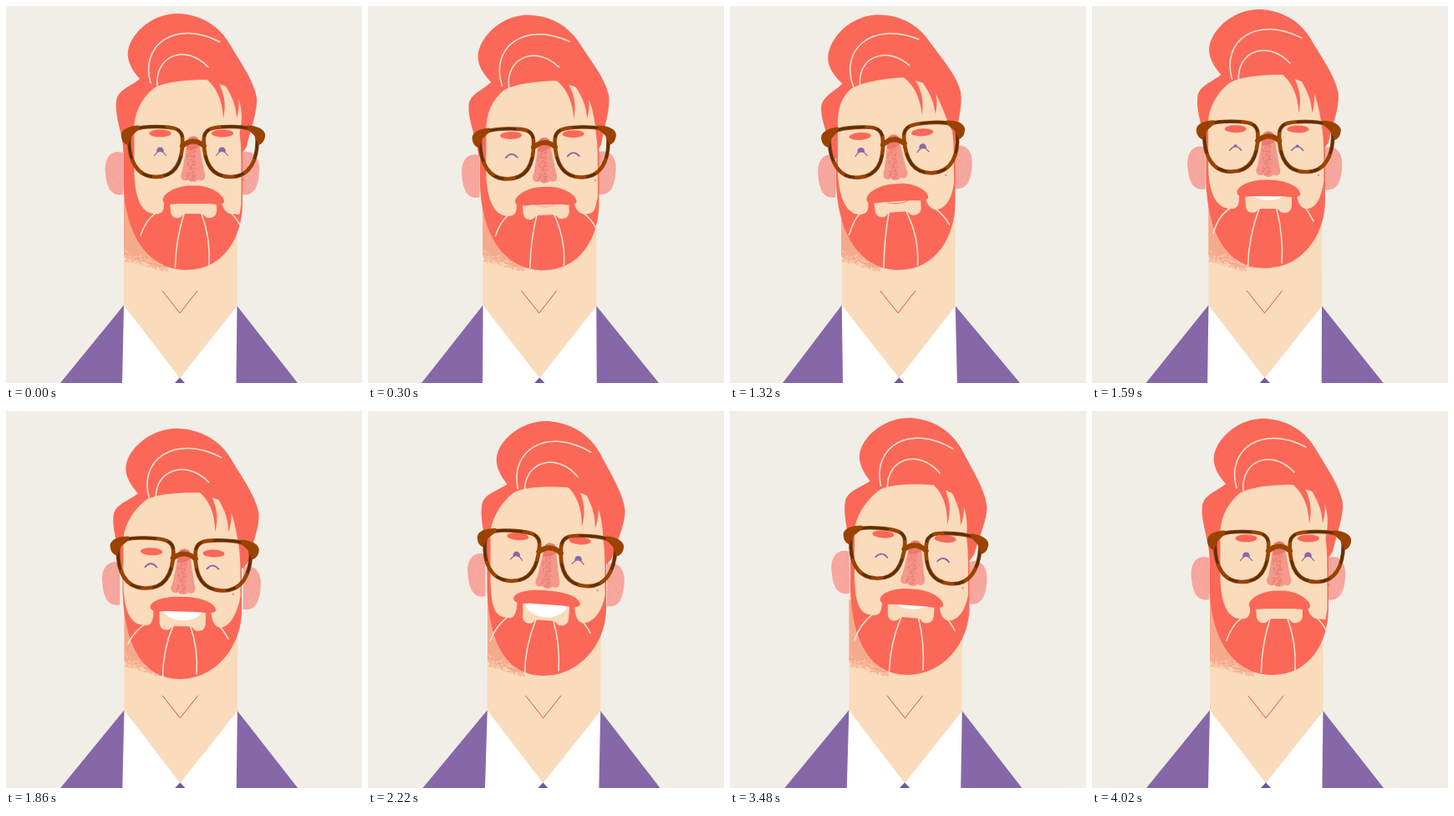
Recreate the animation shown at these times as an HTML page with a canvas. Size 426 px wide and 450 px high, loop 4.05 s.

```html
<!DOCTYPE html>
<html lang="en">
<head>
<meta charset="utf-8">
<title>Bearded man</title>
<style>
  html, body { margin: 0; width: 100%; height: 100%; overflow: hidden; background: #f1eee7; }
  canvas { display: block; }
</style>
</head>
<body>
<canvas id="stage" width="426" height="450"></canvas>
<script>
const g = document.getElementById('stage').getContext('2d');
const LOOP = 4050;
const RED = '#fc6858', SKIN = '#fadbbc', PURPLE = '#8668a9', LINE = '#fbe9d6', FRAME = '#9a4300';

// n: neck shift, hx/hy/lean: hair shift and tilt, a: face tilt, gx/gy: glasses bridge,
// w: head width, jaw: left jaw edge, cx/cy: chin, burn: sideburn width, part: beard parting
const right = { n: 0, hx: 0, hy: 0, lean: 0, a: 0, gx: 224, gy: 161, w: 1, jaw: 140.5, cx: 216, cy: 315,
  burn: 13, part: 223, smile: 0, eye: 1, brow: -9 };
const left = { n: -7.5, hx: -26, hy: 2, lean: -5.5, a: -2.6, gx: 198, gy: 164, w: 1, jaw: 127.5, cx: 203, cy: 316,
  burn: 2, part: 206, smile: .1, eye: 1, brow: -9 };
const leftUp = { ...left, n: -8, hx: -26.5, hy: 0, a: -3.6, gx: 195.5, gy: 159, jaw: 127, cx: 202, cy: 315,
  part: 204.5, brow: -6 };
const rise = { ...right, n: -2, hx: -6, hy: -7, gx: 211, gy: 153, jaw: 136, cx: 207, cy: 312,
  burn: 3, part: 207, smile: .35, eye: .6 };
const laugh = { n: .5, hx: 0, hy: 12, lean: .5, a: 1.8, gx: 213.5, gy: 170, w: 1.035, jaw: 139.5, cx: 208, cy: 320,
  burn: 1, part: 208, smile: .8, eye: 0, brow: -1 };
const grin = { n: 2, hx: 8, hy: 4, lean: 3.5, a: 4, gx: 218, gy: 163, w: 1.02, jaw: 142.5, cx: 210, cy: 316,
  burn: 4, part: 208, smile: 1, eye: 1, brow: -10.5 };
const calm = { n: 1.5, hx: 8.5, hy: 0, lean: 3.3, a: 4.2, gx: 222, gy: 160, w: 1.01, jaw: 144, cx: 212, cy: 315,
  burn: 5, part: 211, smile: .4, eye: 0, brow: -10 };
const grinEnd = { ...grin, hy: 2, gx: 220, gy: 161.5, smile: .85 };

const timeline = [[0, right], [120, right], [480, left], [600, left], [1320, leftUp], [1520, rise],
  [1860, laugh], [2220, grin], [2900, grinEnd], [3380, { ...calm, eye: 1 }], [3480, calm],
  [3740, right], [LOOP, right]];

const clamp = v => Math.max(0, Math.min(1, v));

function poseAt(t) {
  const i = timeline.findIndex(k => k[0] > t);
  const [t0, p] = timeline[i - 1], [t1, q] = timeline[i];
  const u = (t - t0) / (t1 - t0), e = u * u * (3 - 2 * u), out = {};
  for (const k in p) out[k] = p[k] + (q[k] - p[k]) * e;
  out.eye = Math.min(out.eye, Math.abs(t - 300) / 90);
  return out;
}

let seed = 7;
const rnd = () => (seed = seed * 16807 % 2147483647) / 2147483647;
const cloud = n => Array.from({ length: n }, () => [rnd(), rnd(), .25 + rnd() * .35]);
const noseDots = cloud(260), earDots = cloud(60), neckDots = cloud(520);

function fill(d, color) { g.fillStyle = color; g.fill(new Path2D(d)); }
function stroke(d, color, w) {
  g.strokeStyle = color; g.lineWidth = w; g.lineCap = 'round';
  g.stroke(new Path2D(d));
}
function oval(x, y, rx, ry, color) {
  g.fillStyle = color; g.beginPath(); g.ellipse(x, y, rx, ry, 0, 0, 7); g.fill();
}
function group(x, y, deg, draw, sx = 1) {
  g.save(); g.translate(x, y); g.rotate(deg * Math.PI / 180); g.scale(sx, 1);
  draw(); g.restore();
}
function dots(list, color, place) {
  g.fillStyle = color;
  for (const [u, v, r] of list) {
    const [x, y] = place(u, v);
    g.fillRect(x - r, y - r, 2 * r, 2 * r);
  }
}

function drawBody(p) {
  const n = p.n, l = 141 + n, r = 277 + n, cl = 141 + n * .9, cr = 276.5 + n * .85, tip = 208 + n * .7;
  const il = 139 + n * .5, ir = 275.5 + n * .45;
  fill(`M${cl},357 L${tip},444 L${cr},358 L${ir},451 H${il}Z`, '#fff');
  fill(`M${l},200 H${r} L${cr},358 L${tip},444 L${cl},357Z`, SKIN);
  fill(`M${cl},357 L${65 + n * .25},450 V451 H${il}Z`, PURPLE);
  fill(`M${cr},358 L${349 + n * .25},450 V451 H${ir}Z`, PURPLE);
  fill(`M${tip},443.5 L${tip - 7},451 H${tip + 7}Z`, '#6f57a0');
  stroke(`M${187 + n * .9},340 L${208 + n * .85},366.5 L${229 + n * .9},340`, '#d9534a', 1);

  const end = p.cx - 22;
  fill(`M${l},225 V298 Q${l + 20},303 ${end - 12},311 L${end + 15},313 V240Z`, '#f6aa8d');
  dots(neckDots, '#f6aa8d', (u, v) => [l + 1 + u * (end - l - 1), 297 + u * 13 + v * v * 8]);
  dots(neckDots.slice(0, 110), SKIN, (u, v) => [l + 1 + u * (end - l), 298 + u * 13 - v * v * 7]);
}

function drawEars(p) {
  const rise = 85 * Math.sin(p.a * Math.PI / 180), x = p.jaw + 70.5, y = p.gy + 39;
  for (const s of [-1, 1]) group(x + s * 77 * p.w, y + s * rise, 0, () => {
    fill('M-6,-25 C9,-30 17,-17 15,-1 C14,14 9,28 -6,25Z', '#f6a69d');
    dots(earDots, '#f9b6ad', (u, v) => [v * 12, (u - .5) * 40]);
  }, s);
}

function drawHead(p) {
  const { jaw, cx, cy } = p, r = jaw + 142.5, fy = p.gy - 161;
  fill(`M${jaw},${150 + fy} V${212 + fy * .4} C${jaw + 2},${275 + fy * .4} ${cx - 45},${cy} ${cx},${cy}
    C${cx + 45},${cy} ${r},${275 + fy * .4} ${r},${235 + fy * .4} V${158 + fy}Z`, RED);
  group(220 + p.hx, 80 + p.hy, p.lean, () => {
    g.translate(-220, -80);
    fill(`M141,175 C139,150 130,132 132,113 C134,100 149,96 160,87 C152,78 144,66 146,53
      C151,29 178,9 205,9 C235,10 256,25 268,46 C281,68 297,90 300,110
      C301,127 293,145 288,168 L283,175Z`, RED);
    stroke('M173,92 C160,47 202,15 256,43', LINE, 1.5);
    stroke('M181,95 C178,58 216,45 242,73', LINE, 1.5);
  }, p.w);
}

function drawSkin(p, at) {
  const l = p.jaw + p.burn, r = p.jaw + 142, fy = p.gy - 161, lip = 73 - 7 * p.smile;
  const cheek = 210 + fy + 2 * p.burn;
  fill(`M${l},${146 + fy} C${l},${127 + fy} ${at(-61, -52)} ${at(-47, -63)}
    C${at(-33, -71)} ${at(-5, -73)} ${at(16, -73)} L${at(48, -62)}
    C${at(57, -50)} ${at(61, -30)} ${r - 3},${152 + fy} C${r - 1},${165 + fy} ${r - 1},${180 + fy} ${r - 1},${200 + fy}
    V${cheek} C${r - 4},${cheek + 18} ${at(58, 87)} ${at(45, 87)}
    C${at(39, 86)} ${at(35, 80)} ${at(34, lip)} L${at(-35, lip)}
    C${at(-34, 84)} ${at(-38, 88)} ${at(-46, 87)}
    C${at(-60, 87)} ${l + 1},${233 + fy} ${l},${200 + fy}Z`, SKIN);
}

function drawBeardLines(p, at) {
  const q = p.part, fy = p.gy - 161, low = p.cy - 4;
  stroke(`M${at(-46, 87)} Q${q - 56},${256 + fy} ${q - 62},${274 + fy * .4}`, LINE, 1.5);
  stroke(`M${at(-11, 87)} Q${q - 20},${280 + fy * .5} ${q - 20.5},${low + 1}`, LINE, 1.5);
  stroke(`M${at(10, 87)} Q${q + 22},${278 + fy * .5} ${q + 20},${low - 2}`, LINE, 1.5);
  stroke(`M${at(44, 85)} Q${q + 52},${252 + fy} ${q + 58},${263 + fy}`, LINE, 1.5);
}

function drawEye(x, open) {
  group(x, 12 + 2 * (1 - open), 0, () => {
    if (open > .05) oval(0, 0, 4.3 * open, 4.5 * open, PURPLE);
    const arc = `M-7,${3.5 + 2 * open} Q0,-4.5 7,${3.5 + 2 * open}`;
    fill(arc, SKIN);
    stroke(arc, PURPLE, 1.8 - .6 * open);
  });
}

function drawMouth(s) {
  const lip = 76 - 7 * s, w = 26 * Math.min(1, .4 + .6 * s), deep = 3 + 23 * s * s;
  fill(`M-28,${lip - 3} L-27,85 Q-26,92 -19,92 C-13,92 -14,87 -9,87 H9
    C14,87 13,92 19,92 Q27,92 28,84 V${lip - 3}Z`, SKIN);
  const mouth = `M${-w},${lip - 1} C${-w * .7},${lip + deep * .75} ${w * .7},${lip + deep * .75} ${w},${lip - 1}`;
  g.globalAlpha = clamp((s - .12) * 6);
  fill(mouth, '#fff');
  g.globalAlpha = clamp(s * 10) * clamp((.3 - s) * 6);
  stroke(mouth, '#f28b78', 1.2);
  g.globalAlpha = 1;
  const k = 1 + .09 * s, top = 53.5 - 2 * s, x = v => v * k;
  fill(`M${x(-36)},${lip - 4} C${x(-38)},${lip - 13} ${x(-20)},${top} ${x(-4)},${top}
    H${x(4)} C${x(20)},${top} ${x(38)},${lip - 12} ${x(37)},${lip - 3}
    C${x(35)},${lip + 1} ${x(26)},${lip} ${x(18)},${lip - 1} H${x(-18)}
    C${x(-26)},${lip} ${x(-34)},${lip + 1} ${x(-36)},${lip - 4}Z`, RED);
}

function drawNose() {
  const d = 'M-6,-3 Q0,-8 6,-3 L13,36 C17,45 11,50 6,46 C4,50 -4,50 -6,46 C-11,50 -18,45 -13,36Z';
  fill(d, '#f3988b');
  g.save();
  g.clip(new Path2D(d));
  fill('M-7,-8 H7 L8,6 Q0,13 -9,11Z', '#f0796d');
  dots(noseDots, '#ec7469', (u, v) => [-8 + v * 11, u * 52 - 4]);
  g.restore();
}

function drawGlasses() {
  const rim = 'M-32,-14 C-32,-27 -22,-30 0,-30 C22,-30 32,-28 32,-14 C32,13 23,30 0,30 C-23,30 -32,10 -32,-14Z';
  for (const s of [-1, 1]) group(s * 44.7, 13, 0, () => {
    stroke(rim, FRAME, 4.6);
    g.lineCap = 'butt';
    g.setLineDash([34, 14, 12, 22]);
    g.lineDashOffset = -18;
    g.strokeStyle = '#55300f'; g.lineWidth = 2.8; g.stroke(new Path2D(rim));
    g.setLineDash([]);
    fill('M-20,-31.5 C-32,-31 -41,-27 -41.5,-20 C-41,-13 -38,-9 -33,-8 L-30,-18 L-20,-27Z', FRAME);
  }, -s);
  stroke('M-13,6 Q0,-5 13,6', FRAME, 6);
}

function drawFace(p) {
  group(p.gx, p.gy, p.a, () => {
    fill('M13,-76 C27,-66 35,-50 36,-27 C40,-45 37,-58 27,-76Z', RED);
    fill('M33,-76 C43,-58 51,-48 52,-27 C57,-42 55,-58 48,-72Z', RED);
    oval(-39.5, p.brow, 13, 4.5, RED);
    oval(35, p.brow, 13, 4.5, RED);
    drawEye(-39.5, p.eye);
    drawEye(34.5, p.eye);
    drawNose();
    oval(60, 47, 1.1, 1.1, '#ec8069');
    drawMouth(p.smile);
    g.scale(p.w, 1);
    drawGlasses();
  });
}

function draw(t) {
  const p = poseAt(t), a = p.a * Math.PI / 180, c = Math.cos(a), s = Math.sin(a);
  // tilted face point in stage coordinates
  const at = (x, y) => `${(p.gx + x * c - y * s).toFixed(2)},${(p.gy + x * s + y * c).toFixed(2)}`;
  g.fillStyle = '#f1eee7';
  g.fillRect(0, 0, 426, 450);
  drawBody(p);
  drawEars(p);
  drawHead(p);
  drawSkin(p, at);
  drawFace(p);
  drawBeardLines(p, at);
}

const start = performance.now();
function tick() {
  draw((performance.now() - start) % LOOP);
  requestAnimationFrame(tick);
}
tick();
</script>
</body>
</html>
```
